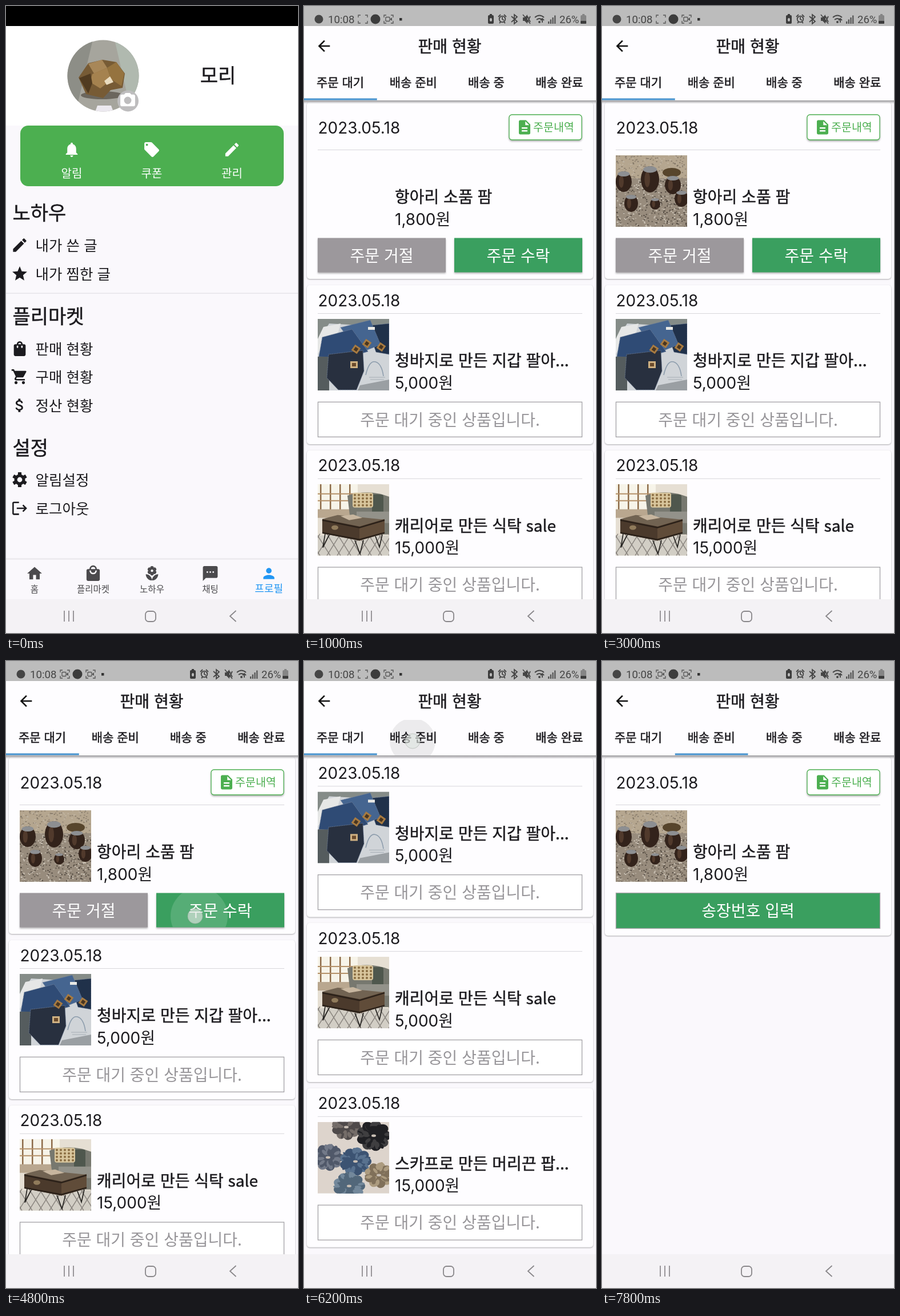
Write an HTML page that moves like this. It is 511x1096 px and loops after 8 s.

```html
<!DOCTYPE html>
<html lang="ko">
<head>
<meta charset="utf-8">
<title>판매 현황</title>
<style>
html, body { margin: 0; width: 100%; height: 100%; overflow: hidden; background: #fff; }
svg { display: block; }
#stage { width: 100%; height: 100%; }
text { font-family: "Noto Sans CJK KR", "Noto Sans CJK", "Noto Sans", sans-serif; fill: #1c1b1f; }
.num { font-family: Inter, "Noto Sans CJK KR", "Noto Sans CJK", sans-serif; }
.bar { font-family: Roboto, sans-serif; fill: #454545; }
.mid { text-anchor: middle; }
.med { stroke: #1c1b1f; stroke-width: .5px; }
.light { font-weight: 300; }
.card { fill: #fefdff; filter: drop-shadow(0 1px 1.2px rgba(0,0,0,.32)); }
.raised { filter: drop-shadow(0 2px 1.5px rgba(0,0,0,.3)); }
.line { fill: none; stroke: #454545; stroke-width: 1.8; }
</style>
</head>
<body>
<svg id="stage" viewBox="0 0 511 1096" preserveAspectRatio="none"></svg>
<script>
const LOOP = 8000, STEP = 100, W = 511;
const GREEN = '#4caf50', DEEP = '#3a9f5f', BLUE = '#2196f3', INK = '#1c1b1f', PAPER = '#faf8fc';

const ICONS = {
  bell: 'M12 22c1.1 0 2-.9 2-2h-4c0 1.1.89 2 2 2zm6-6v-5c0-3.07-1.64-5.64-4.5-6.32V4c0-.83-.67-1.5-1.5-1.5s-1.5.67-1.5 1.5v.68C7.63 5.36 6 7.92 6 11v5l-2 2v1h16v-1z',
  tag: 'M21.4 11.6l-9-9C12 2.2 11.5 2 11 2H4c-1.1 0-2 .9-2 2v7c0 .5.2 1 .6 1.4l9 9c.8.8 2 .8 2.8 0l7-7c.8-.8.8-2 0-2.8zM5.5 7a1.5 1.5 0 1 1 0-3 1.5 1.5 0 0 1 0 3z',
  edit: 'M3 17.25V21h3.75L17.81 9.94l-3.75-3.75zM20.71 7.04c.39-.39.39-1.02 0-1.41l-2.34-2.34c-.39-.39-1.02-.39-1.41 0l-1.83 1.83 3.75 3.75z',
  star: 'M12 17.27L18.18 21l-1.64-7.03L22 9.24l-7.19-.61L12 2 9.19 8.63 2 9.24l5.46 4.73L5.82 21z',
  bag: 'M18 6h-2a4 4 0 0 0-8 0H6c-1.1 0-2 .9-2 2v12c0 1.1.9 2 2 2h12c1.1 0 2-.9 2-2V8c0-1.1-.9-2-2-2zm-8 4a1 1 0 0 1-2 0V8h2zm2-6a2 2 0 0 1 2 2h-4a2 2 0 0 1 2-2zm4 6a1 1 0 0 1-2 0V8h2z',
  mall: 'M19 6h-2A5 5 0 0 0 7 6H5c-1.1 0-2 .9-2 2v12c0 1.1.9 2 2 2h14c1.1 0 2-.9 2-2V8c0-1.1-.9-2-2-2zm-7-3a3 3 0 0 1 3 3H9a3 3 0 0 1 3-3zm0 10a5 5 0 0 1-5-5h2a3 3 0 0 0 6 0h2a5 5 0 0 1-5 5z',
  cart: 'M7 18a2 2 0 1 0 0 4 2 2 0 0 0 0-4zM1 2v2h2l3.6 7.6-1.35 2.4C4.5 15.4 5.5 17 7 17h12v-2H7.4l-.2-.4.9-1.6h7.45c.75 0 1.4-.4 1.75-1l3.6-6.5c.35-.7-.1-1.5-.9-1.5H5.2l-.94-2zm16 16a2 2 0 1 0 0 4 2 2 0 0 0 0-4z',
  dollar: 'M11.8 10.9c-2.27-.59-3-1.2-3-2.15 0-1.09 1.01-1.85 2.7-1.85 1.78 0 2.44.85 2.5 2.1h2.21c-.07-1.72-1.12-3.3-3.21-3.81V3h-3v2.16c-1.94.42-3.5 1.68-3.5 3.61 0 2.31 1.91 3.46 4.7 4.13 2.5.6 3 1.48 3 2.41 0 .69-.49 1.79-2.7 1.79-2.06 0-2.87-.92-2.98-2.1h-2.2c.12 2.19 1.76 3.42 3.68 3.83V21h3v-2.15c1.95-.37 3.5-1.5 3.5-3.55 0-2.84-2.43-3.81-4.7-4.4z',
  exit: 'M11 3H4c-1.1 0-2 .9-2 2v14c0 1.1.9 2 2 2h7v-2H4V5h7zM17 7l-1.4 1.4L18.2 11H8v2h10.2l-2.6 2.6L17 17l5-5z',
  home: 'M10 20v-6h4v6h5v-8h3L12 3 2 12h3v8z',
  leaves: 'M12 22a9 9 0 0 0 9-9 9 9 0 0 0-9 9zM3 13a9 9 0 0 0 9 9 9 9 0 0 0-9-9z',
  chat: 'M20 2H4c-1.1 0-2 .9-2 2v18l4-4h14c1.1 0 2-.9 2-2V4c0-1.1-.9-2-2-2zM9 11H7V9h2zm4 0h-2V9h2zm4 0h-2V9h2z',
  person: 'M12 12a4 4 0 1 0 0-8 4 4 0 0 0 0 8zm0 2c-2.67 0-8 1.34-8 4v2h16v-2c0-2.66-5.33-4-8-4z',
  back: 'M20 11H7.83l5.59-5.59L12 4l-8 8 8 8 1.41-1.41L7.83 13H20z',
  doc: 'M14 2H6c-1.1 0-2 .9-2 2v16c0 1.1.9 2 2 2h12c1.1 0 2-.9 2-2V8zm2 16H8v-2h8zm0-4H8v-2h8zm-3-5V3.5L18.5 9z',
  camera: 'M9 2L7.17 4H4c-1.1 0-2 .9-2 2v12c0 1.1.9 2 2 2h16c1.1 0 2-.9 2-2V6c0-1.1-.9-2-2-2h-3.17L15 2zm3 15a5 5 0 1 1 0-10 5 5 0 0 1 0 10z'
};

// Drawing helpers; text is placed by its vertical centre.
const text = (s, x, cy, size, cls = '', fill = INK) =>
  `<text x="${x}" y="${cy + size * .38}" font-size="${size}" class="${cls}" style="fill:${fill}">${s}</text>`;
const rect = (x, y, w, h, fill, extra = '') =>
  `<rect x="${x}" y="${y}" width="${w}" height="${h}" fill="${fill}" ${extra}/>`;
const oval = (x, y, rx, ry, fill, extra = '') =>
  `<ellipse cx="${x}" cy="${y}" rx="${rx}" ry="${ry}" fill="${fill}" ${extra}/>`;
const shape = (d, fill, extra = '') => `<path d="${d}" fill="${fill}" ${extra}/>`;
const stroke = (d, color, width, extra = '') =>
  `<path d="${d}" fill="none" stroke="${color}" stroke-width="${width}" ${extra}/>`;
const at = (x, y, size, body) =>
  `<g transform="translate(${x - size / 2} ${y - size / 2}) scale(${size / 24})">${body}</g>`;
const icon = (name, x, y, size, fill = INK) => at(x, y, size, shape(ICONS[name], fill));
const group = (id, body) => `<g id="${id}">${body}</g>`;
const repeat = (n, fn) => Array.from({ length: n }, (_, i) => fn(i)).join('');

function randomizer(seed) {
  return () => (seed = (seed * 16807) % 2147483647) / 2147483647;
}

function gear(x, y, size) {
  return at(x, y, size,
    `<circle cx="12" cy="12" r="5.4" fill="none" stroke="${INK}" stroke-width="4"/>` +
    repeat(6, i => rect(9.6, 2, 4.8, 5, INK, `rx=".6" transform="rotate(${i * 60} 12 12)"`)));
}

function flower(x, y, size, fill) {
  const petals = repeat(6, i => `<circle cx="12" cy="3.8" r="2.6" transform="rotate(${i * 60} 12 8)"/>`);
  return at(x, y, size, `<g fill="${fill}">${petals}<path d="${ICONS.leaves}"/>` +
    `<circle cx="12" cy="8" r="3.3" fill="none" stroke="${fill}" stroke-width="1.8"/></g>`);
}

// Product pictures on a 125 x 125 field.
const PICTURES = {
  jars() {
    const rnd = randomizer(7), tones = ['#d8d0c4', '#5f564b', '#b9afa2', '#453d35'];
    const gravel = repeat(700, i => {
      const y = rnd() * 125;
      return rect((rnd() * 125).toFixed(1), y.toFixed(1), 2.4, 1.8, tones[i % 4], `opacity="${y < 40 ? .4 : .85}"`);
    });
    const jar = ([x, y, rx, ry]) => oval(x, y, rx, ry, '#33231b') +
      oval(x - rx * .3, y, rx * .3, ry * .6, '#513a2c') + oval(x, y - ry * .75, rx * .75, ry * .25, '#8d8f92');
    return rect(0, 0, 125, 125, '#988c7d') + rect(0, 0, 125, 40, '#b5a68f') + gravel +
      oval(98, 30, 16, 8, '#57452c') +
      [[14, 46, 14, 18], [60, 42, 16, 23], [100, 52, 14, 16], [27, 84, 12, 15], [69, 85, 9, 10], [115, 76, 12, 14]].map(jar).join('');
  },
  denim() {
    const patch = (x, y) => rect(x - 6, y - 6, 12, 12, '#a87b41', `transform="rotate(35 ${x} ${y})"`) +
      rect(x - 3, y - 3, 6, 6, '#493621', `transform="rotate(35 ${x} ${y})"`);
    const stitch = 'stroke="#71819a" stroke-width=".8" stroke-dasharray="2 1"';
    return rect(0, 0, 125, 125, '#d0d4d8') + shape('M0 0H125V14L20 8 0 40Z', '#858c88') +
      shape('M10 14L40 8 34 30 0 60V35Z', '#e6e7e6') +
      shape('M86 12L125 8V62L102 58Z', '#20314a', stitch) + shape('M40 15L92 2 110 45 72 60Z', '#456590', stitch) +
      shape('M8 32L60 18 88 57 50 68 2 66Z', '#2f4b75', stitch) +
      shape('M0 66H20V125H0Z', '#555c5e') + shape('M19 62L79 55 81 91 68 124H36L16 103Z', '#28303f', stitch) +
      stroke('M84 98q6-26 17-23t14 25', '#8c9cac', 1.6) +
      stroke('M90 102h28M92 106h24', '#a5adb4', 1) + shape('M74 116L125 106V125H70Z', '#9a9fa3') + rect(88, 14, 12, 5, '#e8e8e4') +
      patch(67, 53) + patch(86, 43) + patch(111, 49) + rect(57, 74, 13, 12, '#cfb182') + rect(60, 77, 7, 6, '#6b4b2c');
  },
  trunk() {
    const panes = repeat(4, i => rect(4 + i * 17, 0, 2.5, 48, '#8d6b49'));
    const rug = repeat(9, i => stroke(`M${i * 18 - 20} 125l24-38M${i * 18 - 20} 87l24 38`, '#8b8680', 1.5));
    const dots = repeat(20, i => oval(65 + i % 5 * 7, 19 + (i / 5 | 0) * 6, 2, 2, '#8a6d42'));
    return rect(0, 0, 125, 125, '#e6dfd3') + rect(0, 0, 70, 45, '#f7f4e9') + panes +
      stroke('M0 17H65M0 29H65', '#b59169', 2) + rect(0, 44, 60, 15, '#b9a78f') +
      shape('M52 20Q90 8 125 22V88H60Z', '#77786f') + rect(95, 18, 20, 34, '#4f574d', 'rx="4"') +
      rect(61, 15, 36, 26, '#d8c59c', 'rx="4"') + dots + shape('M68 48H125V68H68Z', '#93928a') +
      rect(0, 90, 125, 35, '#d2cec5') + rug +
      shape('M8 61L35 54 116 62 73 78Z', '#716352') + shape('M8 61L73 74V99L8 86Z', '#4b3a2c') +
      shape('M73 74L117 61V86L73 99Z', '#604c39') + stroke('M8 63L73 76 117 63M8 85L73 97 117 85', '#2b2119', 2.5) +
      oval(30, 76, 6, 4, '#907b5b') + shape('M40 56L62 53 78 59 55 63Z', '#c7b69f') +
      stroke('M13 87L9 111 20 89M65 98L74 122 80 98M101 91L108 110 113 88', '#252320', 1.7);
  },
  scrunchies() {
    const rnd = randomizer(11);
    const fold = (r, color) => {
      const a = rnd() * 2 * Math.PI, d = r * (.45 + rnd() * .5), turn = a * 180 / Math.PI;
      return oval(d, 0, 6, 2 + rnd() * 2, color, `transform="rotate(${turn.toFixed()})"`);
    };
    const scrunchie = ([x, y, r, light, dark]) => `<g transform="translate(${x} ${y}) scale(1 .88)">` +
      repeat(9, i => oval(r * .75, 0, r * .42, r * .38, i % 2 ? light : dark, `transform="rotate(${i * 40})"`)) +
      oval(0, 0, r * .75, r * .75, dark) + repeat(26, i => fold(r, i % 2 ? light : dark)) +
      oval(0, 0, 4, 2.5, '#c9bfb5') + '</g>';
    return rect(0, 0, 125, 125, '#ddd4cc') + [
      [50, 9, 22, '#756d69', '#4f4a4a'], [98, 24, 26, '#3f3e40', '#202024'], [18, 62, 23, '#737a89', '#505869'],
      [66, 69, 24, '#59728f', '#3c5372'], [107, 93, 22, '#ac9b7f', '#80705a'], [55, 112, 24, '#73889b', '#52677a']
    ].map(scrunchie).join('');
  }
};

const picture = (name, y, cls) =>
  `<svg class="${cls}" x="24" y="${y}" width="125" height="125" viewBox="0 0 125 125">${PICTURES[name]()}</svg>`;

const dateLabel = cy => text('2023.05.18', 24.5, cy, 28, 'num');

function cardBody(y, name, title, price, cls) {
  return rect(24, y + 49, 463, 1, '#d8d6db') + picture(name, y + 59, cls) +
    text(title, 159, y + 131.5, 28, 'med') + text(price + '원', 159, y + 170, 28, 'num');
}

function waitingCard(y, name, title, price, cls = '') {
  return rect(5, y, 501, 278, '', 'rx="5" class="card"') + dateLabel(y + 26) +
    cardBody(y, name, title, price, cls) +
    rect(24.5, y + 204.3, 462, 61, '#fff', 'stroke="#a3a1a5" stroke-width="1.3"') +
    text('주문 대기 중인 상품입니다.', 255.5, y + 235, 28, 'mid', '#98969a');
}

function orderCard(height, buttons, cls = '') {
  return rect(5, 168, 501, height, '', 'rx="5" class="card"') + dateLabel(212) +
    rect(359, 190, 127, 44, '#fff', `rx="5" stroke="${GREEN}" stroke-width="1.3" class="raised"`) +
    icon('doc', 386, 212, 30, GREEN) + text('주문내역', 401, 212, 19.5, 'light', GREEN) +
    cardBody(202, 'jars', '항아리 소품 팜', '1,800', cls) + buttons;
}

const button = (x, w, label, fill) => rect(x, 405.5, w, 60, fill, 'class="raised"') +
  text(label, x + w / 2, 436, 28, 'mid', '#fff');

function statusBar() {
  const frame = x => stroke(`M${x - 4} 16h-4v4m0 6v4h4m8 0h4v-4m0-6v-4h-4`, '#555', 1.3);
  const cam = x => rect(x - 5, 19.5, 7, 7, 'none', 'stroke="#555" stroke-width="1.3" rx="1"') + shape(`M${x + 2} 23l4-3v6z`, '#555');
  return rect(0, 0, W, 35, '#bcbcbc') + oval(26, 23, 7.5, 7.5, '#454545') + text('10:08', 42, 23, 18.7, 'bar', '#454545') +
    frame(103) + group('recording', cam(103)) + oval(125, 23, 8.5, 8.5, '#3c3c3c') + frame(148) + cam(148) +
    rect(167, 21, 4.5, 4.5, '#333') +
    rect(322, 16, 10, 15, '#3c3c3c', 'rx="2"') + rect(325, 14, 4, 3, '#3c3c3c') + oval(327, 24, 2, 3, '#bcbcbc') +
    `<g class="line"><circle cx="347" cy="23" r="5.3"/><path d="M347 19v4l3 2M340 19l4-4m6 0l4 4M342 30l2-2m6 0l2 2
      M363 18l10 9-5 4V15l5 4-10 9M391 18l5 10m0-10l-5 10"/>
      <path d="M404 20q8-7 16 0M407 24q5-4 10 0M417 29v-7m-3 3l3-3 3 3"/></g>` +
    shape('M383 20h3l5-5v16l-5-5h-3z', '#454545') + oval(412, 28, 2, 2, '#454545') + stroke('M383 15l13 16', '#454545', 1.5) +
    repeat(4, i => rect(427 + i * 3.7, 27 - i * 3.5, 2.3, 4 + i * 3.5, '#555')) +
    text('26%', 447, 23, 18.5, 'bar', '#454545') + rect(484, 16, 10, 15, '#858585', 'rx="2"') +
    rect(484, 26, 10, 5, '#3c3c3c', 'rx="1"') + rect(487, 14, 4, 2, '#858585');
}

function profilePage() {
  const rock = shape('M127 125l17-25 25-6 24 4 15 20-4 25-21 4-13 14-30-7z', '#775b35') +
    shape('M144 101l24-7 9 14-23 10z', '#a88758') + shape('M151 119l26-11 7 21-19 15-18-11z', '#a5824f') +
    shape('M128 126l20-8 3 17-7 18z', '#513b20') + shape('M177 108l16-10 14 20-5 22-18-12z', '#95733f') +
    shape('M172 131l10-8 6 10-12 5z', '#eadcc0');
  const rows = [['edit', '내가 쓴 글', 418], ['star', '내가 찜한 글', 468], ['bag', '판매 현황', 599], ['cart', '구매 현황', 648],
    ['dollar', '정산 현황', 698], ['', '알림설정', 828], ['exit', '로그아웃', 878]];
  const actions = [['bell', '알림', 115], ['tag', '쿠폰', 255], ['edit', '관리', 395.5]];
  const tabs = [['home', '홈', 50], ['mall', '플리마켓', 152.5], ['', '노하우', 255.5], ['chat', '채팅', 357.5]];
  return rect(0, 0, W, 1040, PAPER) + rect(0, 35, W, 174, '#fff') + rect(0, 0, W, 35, '#000') +
    '<clipPath id="round"><circle cx="170" cy="122" r="62.5"/></clipPath><g clip-path="url(#round)">' +
    rect(107, 59, 126, 126, '#a6a59d') + shape('M107 59h45l-30 126h-15z', '#8d8e87') + shape('M190 59h43v90l-20 10z', '#b0b9af') +
    oval(168, 156, 37, 7, '#6b665d') + rock + shape('M160 174h24l4 11h-32z', '#ece9ef') + '</g>' +
    oval(213.5, 166, 18.5, 18.5, '#bebdbe') + icon('camera', 213, 165, 31, '#fff') +
    text('모리', 371, 121, 34, 'mid med') +
    rect(25, 209, 461, 106, GREEN, 'rx="14"') +
    actions.map(([name, label, x]) => icon(name, x, 251, 31, '#fff') + text(label, x, 292, 20, 'mid', '#fff')).join('') +
    [['노하우', 361], ['플리마켓', 542], ['설정', 772]].map(([s, y]) => text(s, 11.5, y, 34, 'med')).join('') +
    rows.map(([name, label, y]) => (name ? icon(name, 24, y, 31) : gear(24, y, 31)) + text(label, 51.5, y, 25.5, 'light')).join('') +
    rect(0, 501.5, W, 1.3, '#e4e2e7') + rect(0, 965, W, 3, '#eeecf0') + rect(0, 968, W, 70, PAPER) +
    tabs.map(([name, label, x]) => (name ? icon(name, x, 992, 31, '#4b4a4d') : flower(x, 992, 29, '#4b4a4d')) +
      text(label, x, 1019, 15.5, 'mid', '#4b4a4d')).join('') +
    icon('person', 460, 992, 29, BLUE) + text('프로필', 460, 1018, 18, 'mid', BLUE);
}

function salesPage() {
  const step = 288.7, top = 169.4;
  const jeans = ['denim', '청바지로 만든 지갑 팔아...', '5,000'], chest = '캐리어로 만든 식탁 sale';
  const before = orderCard(309, button(24, 224, '주문 거절', '#9c989c') + button(263, 224, '주문 수락', DEEP), 'late') +
    waitingCard(488, ...jeans, 'soon') + waitingCard(488 + step, 'trunk', chest, '15,000', 'soon');
  const after = waitingCard(top, ...jeans) + waitingCard(top + step, 'trunk', chest, '5,000') +
    waitingCard(top + step * 2, 'scrunchies', '스카프로 만든 머리끈 팝...', '15,000');
  const ready = orderCard(312, rect(24.5, 405.5, 462, 62, DEEP, 'stroke="#a3a1a5" stroke-width="1.3"') +
    text('송장번호 입력', 255.5, 436, 28, 'mid', '#fff'));
  const tabs = ['주문 대기', '배송 준비', '배송 중', '배송 완료'];
  return rect(0, 0, W, 1037, PAPER) +
    group('waiting', group('before', before) + group('after', after)) + group('ready', ready) +
    `<path id="spinner" fill="none" stroke="${BLUE}" stroke-width="5.2"/>` +
    rect(0, 165, W, 6, 'url(#shade)') + rect(0, 35, W, 130, '#fefdff') + statusBar() +
    icon('back', 35, 70, 31, '#111') + text('판매 현황', 255, 70, 28, 'mid med') +
    tabs.map((s, i) => text(s, 63.5 + i * 127.75, 133, 21, 'mid med')).join('') +
    rect(0, 161.5, 127.75, 3, '#438fcb', 'id="marker"');
}

function systemBar() {
  return rect(0, 1037, W, 59, '#f4f2f5') + stroke('M102 1057v19m8-19v19m8-19v19', '#89878a', 1.7) +
    rect(244, 1058, 18, 18, 'none', 'rx="5.5" stroke="#89878a" stroke-width="1.8"') +
    stroke('M402.5 1057l-10.5 9.5 10.5 9.5', '#89878a', 1.8);
}

const stage = document.getElementById('stage');
stage.innerHTML = `<defs>
  <linearGradient id="shade" x2="0" y2="1"><stop stop-color="#000" stop-opacity=".38"/><stop offset="1" stop-color="#000" stop-opacity="0"/></linearGradient>
  <clipPath id="accept"><rect x="263" y="405" width="224" height="60"/></clipPath>
  <clipPath id="tab"><rect x="128" y="103" width="128" height="62"/></clipPath>
  <clipPath id="row"><rect x="0" y="574" width="511" height="50"/></clipPath></defs>` +
  group('profile', profilePage()) + group('sales', salesPage()) +
  '<g id="rippleClip"><circle id="ripple"/></g>' +
  '<circle id="touch" r="13" fill="#dfe5e1" fill-opacity=".65" stroke="#a3aaa5" stroke-opacity=".55"/>' + systemBar();

const $ = id => document.getElementById(id);
const show = (el, on) => { el.style.display = on ? '' : 'none'; };
const set = (el, attrs) => { for (const k in attrs) el.setAttribute(k, attrs[k]); };
const clamp = v => Math.min(1, Math.max(0, v));

function bezier(x1, y1, x2, y2) {
  const curve = (a, b, u) => 3 * a * u * (1 - u) ** 2 + 3 * b * u * u * (1 - u) + u ** 3;
  return x => {
    if (x <= 0 || x >= 1) return clamp(x);
    let lo = 0, hi = 1;
    for (let i = 0; i < 20; i++) {
      const u = (lo + hi) / 2;
      if (curve(x1, x2, u) < x) lo = u; else hi = u;
    }
    return curve(y1, y2, (lo + hi) / 2);
  };
}
const ease = bezier(.25, .1, .25, 1), fastOutSlowIn = bezier(.4, 0, .2, 1);

function spinnerArc(ms, cx, cy, r) {
  const cycle = ms / 1333 % 1, full = 1.5 * Math.PI;
  const head = fastOutSlowIn(clamp(cycle * 2)), tail = fastOutSlowIn(clamp(cycle * 2 - 1));
  const from = -Math.PI / 2 + tail * full + ms / 2222 * 2 * Math.PI + cycle * Math.PI / 2;
  const sweep = Math.max((head - tail) * full, .02);
  const point = a => `${cx + r * Math.cos(a)} ${cy + r * Math.sin(a)}`;
  return `M${point(from)}A${r} ${r} 0 ${sweep > Math.PI ? 1 : 0} 1 ${point(from + sweep)}`;
}

// from, to, x, y, ripple radius, ripple colour, clip, finger visible
const TAPS = [
  [100, 200, 110, 599, 70, '#000', 'row', true],
  [4700, 4800, 331, 446, 24, '#fff', 'accept', true],
  [4800, 4900, 338, 446, 50, '#fff', 'accept', true],
  [4900, 5000, 355, 440, 120, '#fff', 'accept', false],
  [6200, 6300, 190, 140, 40, '#000', 'tab', true],
  [6300, 6400, 190, 136, 70, '#000', 'tab', false]
];

function drawTap(t) {
  const tap = TAPS.find(([from, to]) => t >= from && t < to);
  show($('rippleClip'), tap);
  show($('touch'), tap && tap[7]);
  if (!tap) return;
  const [, , x, y, r, fill, clip] = tap;
  set($('rippleClip'), { 'clip-path': `url(#${clip})` });
  set($('ripple'), { cx: x, cy: y, r, fill, 'fill-opacity': fill === '#fff' ? .14 : .07 });
  set($('touch'), { cx: clip === 'accept' ? 331 : x, cy: y });
}

function draw(t) {
  const enter = clamp((t - 150) / 300), scale = .85 + .15 * fastOutSlowIn(enter);
  show($('profile'), enter < 1);
  show($('sales'), enter > 0);
  set($('sales'), {
    opacity: clamp(enter * 2.5),
    transform: `translate(255.5 548) scale(${scale}) translate(-255.5 -548)`
  });

  show($('recording'), Math.floor(t / 500) % 2);
  show($('before'), t >= 500 && t < 5000);
  show($('after'), t >= 5000);
  document.querySelectorAll('.soon').forEach(el => show(el, t >= 800));
  document.querySelectorAll('.late').forEach(el => show(el, t >= 1400));

  const slide = ease(clamp((t - 6280) / 300));
  show($('waiting'), slide < 1);
  show($('ready'), t >= 7000);
  set($('waiting'), { transform: `translate(${-slide * W} 0)` });
  set($('marker'), { x: slide * 127.75 });

  const second = t >= 6200;
  show($('spinner'), t < 500 || (slide > 0 && t < 7000));
  set($('spinner'), {
    d: spinnerArc(second ? t - 6200 : t, 255.5 + (second ? (1 - slide) * W : 0), 601, 22.5)
  });
  drawTap(t);
}

const start = performance.now();
function tick(now) {
  const t = Math.max(0, now - start) % LOOP;
  draw(Math.floor(t / STEP) * STEP);
  requestAnimationFrame(tick);
}
draw(0);
requestAnimationFrame(tick);
</script>
</body>
</html>
```
